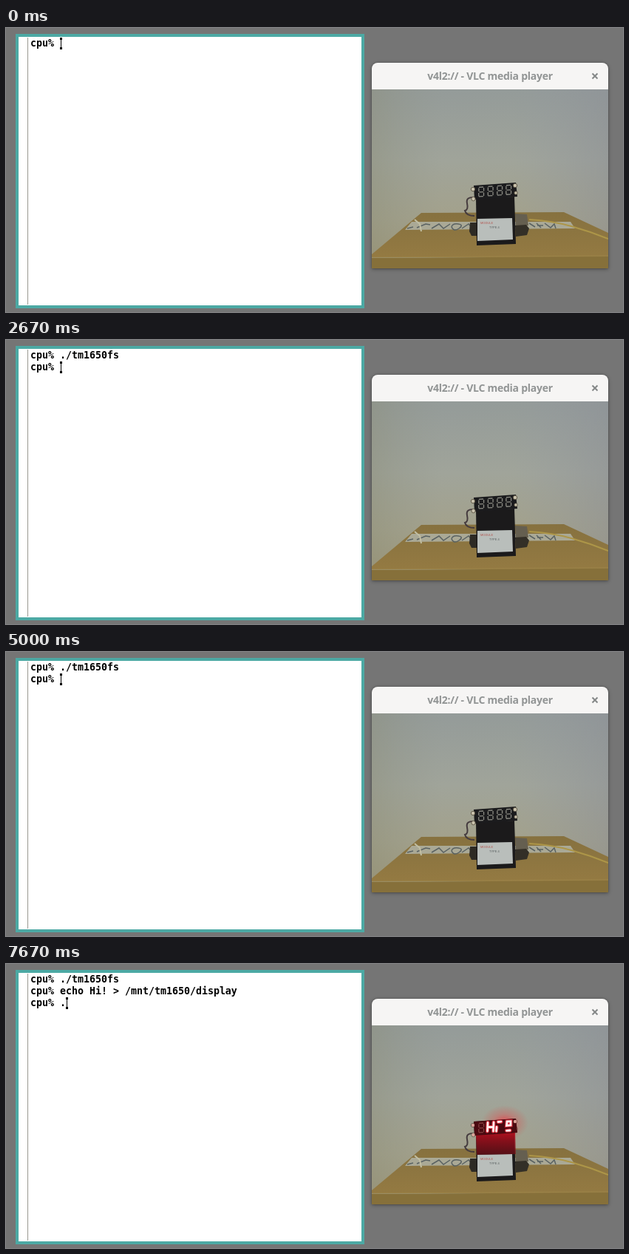
An HTML page for the animation above (8 s loop, 835 px wide and 384 px high).

```html
<!DOCTYPE html>
<html lang="en">
<head>
<meta charset="utf-8">
<title>Terminal and camera</title>
<style>
html, body { margin: 0; width: 100%; height: 100%; overflow: hidden; background: #757575; }
.stage { position: relative; width: 835px; height: 384px; overflow: hidden; }
.term {
  position: absolute; left: 13px; top: 8px; width: 464px; height: 363px;
  border: 4px solid #4ca9a4; background: #fff;
}
.term::before {
  content: ""; position: absolute; left: 12px; top: 1px; width: 1px; height: 361px; background: #999991;
}
.term pre {
  position: absolute; left: 16px; top: 1px; margin: 0; color: #000;
  font: bold 13.29px/16px "DejaVu Sans Mono", monospace;
}
.cursor { position: absolute; left: 56px; top: 1px; width: 3px; height: 16px; animation: cursor 8s step-end infinite; }
.cursor::before {
  content: ""; position: absolute; left: 1px; width: 1px; height: 16px; background: #000;
}
.cursor::after {
  content: ""; position: absolute; width: 3px; height: 10px;
  border: solid #000; border-width: 3px 0;
}
.player {
  position: absolute; left: 495px; top: 47px; width: 320px; height: 278px;
  border-radius: 8px 8px 0 0; box-shadow: 0 1px 5px rgba(0,0,0,.4), 0 0 1px #444;
}
.bar {
  height: 36px; border-radius: 8px 8px 0 0; background: #f6f5f4; color: #929595;
  font: bold 14px/36px "Noto Sans", "Open Sans", sans-serif; text-align: center; letter-spacing: -.26px; white-space: nowrap;
}
.bar svg { position: absolute; left: 297px; top: 13px; }
.video { position: absolute; left: 0; top: 36px; }

.s { animation: 8s step-end infinite; }
.s1 { animation-name: s1; }
.s2 { animation-name: s2; }
.s3 { animation-name: s3; }
.s4 { animation-name: s4; }
.s5 { animation-name: s5; }
.s6 { animation-name: s6; }
.s7 { animation-name: s7; }
@keyframes s1 { 0% { visibility: hidden } 8.37% { visibility: visible } }
@keyframes s2 { 0% { visibility: hidden } 12.49% { visibility: visible } }
@keyframes s3 { 0% { visibility: hidden } 16.62% { visibility: visible } }
@keyframes s4 { 0% { visibility: hidden } 24.99% { visibility: visible } }
@keyframes s5 { 0% { visibility: hidden } 29.12% { visibility: visible } }
@keyframes s6 { 0% { visibility: hidden } 66.62% { visibility: visible } }
@keyframes s7 { 0% { visibility: hidden } 95.87% { visibility: visible } }
@keyframes cursor {
  0% { transform: none }
  8.37% { transform: translate(8px, 0) }
  12.49% { transform: translate(16px, 0) }
  16.62% { transform: translate(24px, 0) }
  24.99% { transform: translate(80px, 0) }
  29.12% { transform: translate(0, 16px) }
  66.62% { transform: translate(0, 32px) }
  95.87% { transform: translate(8px, 32px) }
}
</style>
</head>
<body>
<div class="stage">
  <div class="term">
    <pre>cpu% <span class="s s1">.</span><span class="s s2">/</span><span class="s s3">t</span><span class="s s4">m1650fs</span>
<span class="s s5">cpu% </span><span class="s s6">echo Hi! &gt; /mnt/tm1650/display</span>
<span class="s s6">cpu% </span><span class="s s7">.</span></pre>
    <div class="cursor"></div>
  </div>

  <div class="player">
    <div class="bar">v4l2:// - VLC media player
      <svg width="10" height="10"><path d="M1.500 1.500 8.500 8.500M8.500 1.500 1.500 8.500" stroke="#858888" stroke-width="2"/></svg>
    </div>
    <svg class="video" width="320" height="242" viewBox="495 83 320 242">
      <defs>
        <linearGradient id="wall" x1="0" y1="0" x2="0" y2="1">
          <stop offset="0" stop-color="#949b99"/>
          <stop offset=".4" stop-color="#a0a49a"/>
          <stop offset=".72" stop-color="#a3a18b"/>
          <stop offset="1" stop-color="#a09878"/>
        </linearGradient>
        <linearGradient id="side">
          <stop offset="0" stop-color="#8a8c76" stop-opacity=".4"/>
          <stop offset=".3" stop-color="#90958b" stop-opacity="0"/>
          <stop offset=".6" stop-color="#9298a4" stop-opacity="0"/>
          <stop offset="1" stop-color="#8a8d96" stop-opacity=".45"/>
        </linearGradient>
        <linearGradient id="card" x1="0" y1="0" x2="0" y2="1">
          <stop offset="0" stop-color="#86713f"/>
          <stop offset="1" stop-color="#947a42"/>
        </linearGradient>
        <radialGradient id="glow">
          <stop offset="0" stop-color="#ff2838" stop-opacity=".75"/>
          <stop offset=".5" stop-color="#f03038" stop-opacity=".28"/>
          <stop offset="1" stop-color="#e03030" stop-opacity="0"/>
        </radialGradient>
        <linearGradient id="spill" x1="0" y1="0" x2="0" y2="1">
          <stop offset="0" stop-color="#b80f1e" stop-opacity=".9"/>
          <stop offset="1" stop-color="#7c0a14" stop-opacity=".6"/>
        </linearGradient>
        <g id="digit" fill="none" stroke-width="1.3">
          <path d="M1 0H7M7.5 1 7.2 5.5M7 7.500 6.700 12M0 12.500H6M.2 7.500 0 12M.8 1 .5 5.500M1 6.500H6.500"/>
        </g>
      </defs>

      <path fill="url(#wall)" d="M495 83h320v242H495z"/>
      <path fill="url(#side)" d="M495 83h320v242H495z"/>

      <!-- cardboard box -->
      <path fill="url(#card)" d="M562 250 755 249 815 277V310H495V306z"/>
      <path fill="#86703a" d="M495 311 815 309V325H495z"/>
      <path stroke="#9c8449" d="M495 310 815 308"/>
      <path fill="#aaa996" d="M549 262 764 262 770 271 540 273z"/>
      <g fill="none" stroke="#5a6262" stroke-width="1.5">
        <path d="M543 271l8-2M556 270l12-5 6 1M576 271l10-6 6 6 9-6M603 269q1-5 9-4t1 6-10-2M617 271l9-6 4 4"/>
        <path d="M708 264l8 5M718 264l6 6M719 267h8M729 264l8 6 5-5 2 6"/>
      </g>
      <path d="M553 259 560 265 562 275" fill="none" stroke="#c2bfa4" stroke-width="2"/>
      <path d="M708 259Q740 261 765 268T815 285" fill="none" stroke="#ad9648" stroke-width="2"/>

      <!-- device -->
      <path d="M634 229Q622 228 624 237T621 247Q623 254 634 254" fill="none" stroke="#453b3e" stroke-width="2"/>
      <path fill="#2d2a24" d="M628 263h9v18h-7l-3-6z"/>
      <path fill="#655f50" d="M689 251l16 1 2 15-17 2z"/>
      <path fill="#332f27" d="M689 267l15-1 4 5-3 9-15 2z"/>
      <path fill="#1b1a1b" d="M636 230 688 228 690 292 637 294z"/>
      <path fill="#b9bebb" d="M638 258 685 257 686 286 638 288z"/>
      <g font-family="Liberation Sans, Arial, sans-serif">
        <text x="642" y="265" font-size="4" fill="#b3534d">MODULE</text>
        <text x="654" y="271" font-size="4" fill="#555c5d">TYPE 4</text>
      </g>

      <path fill="#1b1b1d" d="M633 213 690 209 692 228 634 232z"/>
      <g fill="#c9c2ad" stroke="#504839" stroke-width=".8">
        <circle cx="632" cy="218" r="2.700"/><circle cx="632.500" cy="231" r="2.700"/>
        <circle cx="689" cy="213" r="2.700"/><circle cx="690" cy="223" r="2.200"/>
      </g>
      <g stroke="#8c8c84">
        <use href="#digit" transform="translate(639 215.500) rotate(-4)"/>
        <use href="#digit" transform="translate(651.500 214.500) rotate(-4)"/>
        <use href="#digit" transform="translate(664 213.600) rotate(-4)"/>
        <use href="#digit" transform="translate(676 212.800) rotate(-4)"/>
      </g>

      <!-- lit segments -->
      <g class="s s6">
        <ellipse cx="675" cy="215" rx="32" ry="24" fill="url(#glow)"/>
        <path fill="url(#spill)" d="M636 231 689 228 690 257 637 258z"/>
        <path fill="#4a0a10" d="M633 213 690 209 692 228 634 232z"/>
        <use href="#digit" stroke="#84403f" transform="translate(639 215.500) rotate(-4)"/>
        <g fill="none" stroke="#f52c3c" stroke-width="5" stroke-linecap="round" opacity=".8">
          <path id="hi" d="M652 214.500 651.500 226M660 214 659.500 226M652 220.500H659M664 220.500 663.500 226M666 213.500 670 213.200M678 213 683 212.700V218L677.500 218.500zM677.500 225.300 682 225"/>
        </g>
        <use href="#hi" fill="none" stroke="#fff0ef" stroke-width="2.800" stroke-linecap="round"/>
        <g fill="#d8a398"><circle cx="632" cy="218" r="2.200"/><circle cx="632.500" cy="231" r="2.200"/><circle cx="689" cy="213" r="2.200"/></g>
      </g>
    </svg>
  </div>
</div>
</body>
</html>
```
